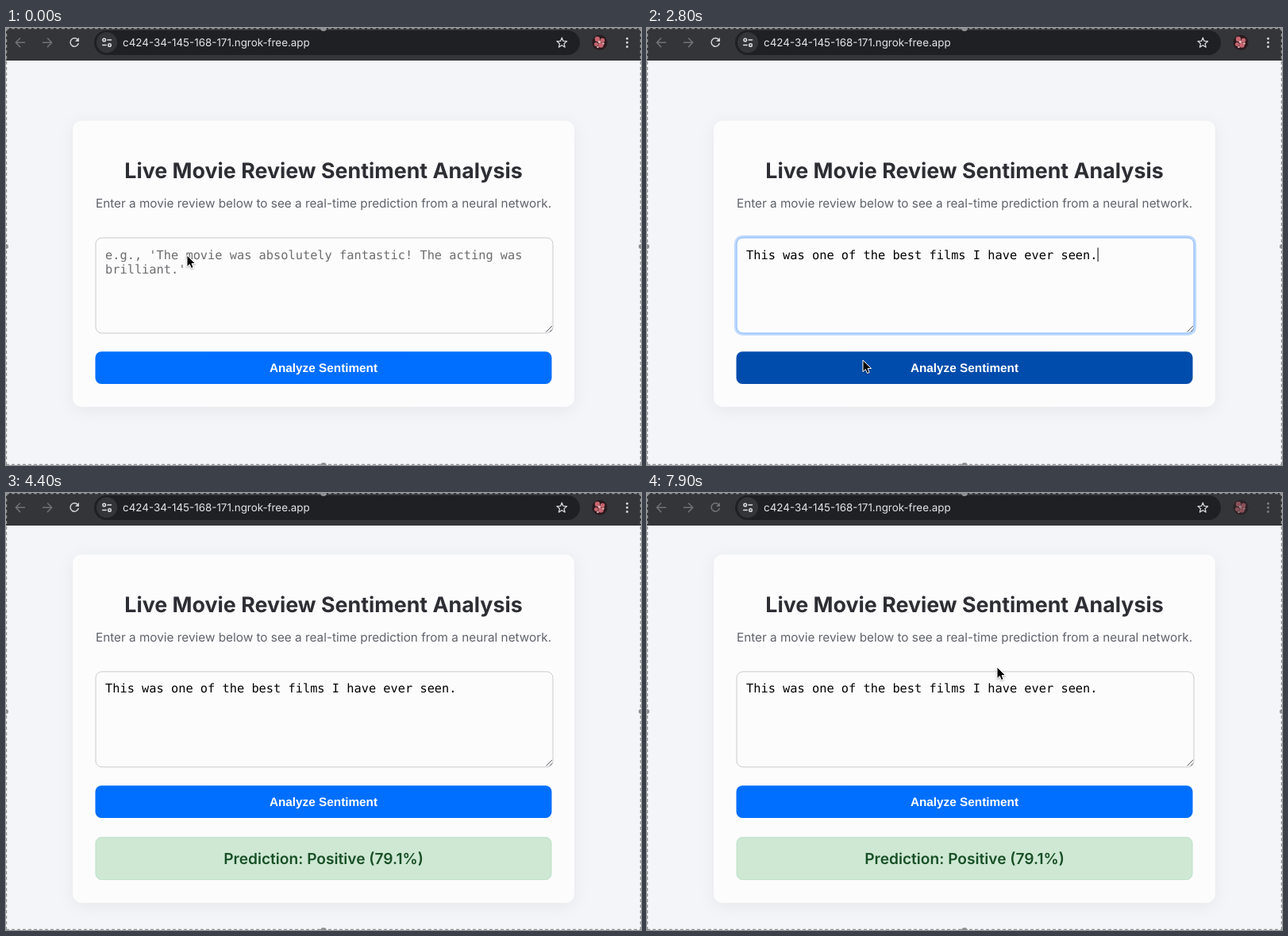
An HTML page for the animation above (8000 ms loop, 800 by 550 pixels).

```html
<!DOCTYPE html>
<html lang="en">
<head>
<meta charset="utf-8">
<title>Sentiment demo</title>
<style>
  html, body { margin: 0; width: 100%; height: 100%; overflow: hidden; background: #f4f5f9; }
  svg { display: block; width: 800px; height: 550px; }
  text { font-family: Inter, sans-serif; font-optical-sizing: none; text-rendering: geometricPrecision; white-space: pre; }
  .mid { text-anchor: middle; }
  .mono { font: 15.32px "DejaVu Sans Mono", monospace; }
  .line { fill: none; stroke-width: 1.5; stroke-linecap: round; stroke-linejoin: round; }
  .edge { fill: none; stroke: #939496; stroke-width: 2; stroke-dasharray: 4 3; }
</style>
</head>
<body>
<svg viewBox="0 0 800 550">
  <defs>
    <filter id="soft" x="-10%" y="-15%" width="120%" height="130%">
      <feDropShadow dx="0" dy="4" stdDeviation="9.5" flood-color="#000" flood-opacity=".06"/>
    </filter>
    <filter id="cast" x="-50%" y="-50%" width="200%" height="200%">
      <feDropShadow dx="0" dy="1" stdDeviation=".9" flood-color="#000" flood-opacity=".35"/>
    </filter>
  </defs>
  <rect width="800" height="550" fill="#f4f5f9"/>

  <!-- browser bar -->
  <rect width="800" height="41" fill="#343538"/>
  <rect x="111" y="3" width="612" height="31" rx="15.5" fill="#1f2023"/>
  <g class="line" stroke="#717276">
    <path d="M23.5 18.3H12.5M17.5 13l-5.2 5.3 5.2 5.3"/>
    <path d="M46.5 18.3h11M52.5 13l5.2 5.3-5.2 5.3"/>
  </g>
  <g id="reload">
    <path class="line" stroke="#d2d3d6" d="M90.6 15.2A5.2 5.2 0 1 0 91.2 19.6"/>
    <path fill="#d2d3d6" d="M92 12v5h-5z"/>
  </g>
  <circle cx="127" cy="18.3" r="13" fill="#343538"/>
  <g class="line" stroke="#dedfe2">
    <circle cx="123.7" cy="15" r="1.8"/><path d="M128 15h4.5"/>
    <circle cx="130.5" cy="21.5" r="1.8"/><path d="M121.7 21.5h4.5"/>
  </g>
  <text x="147" y="23.2" font-size="13.4" fill="#e5e6e9">c424-34-145-168-171.ngrok-free.app</text>
  <path id="star" class="line" stroke="#d2d3d6" style="stroke-width:1.3"/>
  <g id="avatar">
    <circle cx="748" cy="18.3" r="9.5" fill="#2a1a1e"/>
    <g fill="#c6656f">
      <circle cx="745" cy="14" r="3.2"/><circle cx="751.5" cy="15.5" r="2.8"/>
      <circle cx="743.5" cy="20.5" r="2.5"/><circle cx="749.5" cy="21.5" r="3.3"/>
    </g>
    <g fill="#e7b1b1">
      <circle cx="747.5" cy="17.5" r="1.8"/><circle cx="752.5" cy="19.5" r="1.3"/><circle cx="745.5" cy="24" r="1.3"/>
    </g>
  </g>
  <g id="dots" fill="#d2d3d6">
    <circle cx="782.5" cy="13.2" r="1.5"/><circle cx="782.5" cy="18.3" r="1.5"/><circle cx="782.5" cy="23.4" r="1.5"/>
  </g>

  <!-- page -->
  <rect id="card" x="84" width="632" rx="11.5" fill="#fcfcfd" filter="url(#soft)"/>
  <g id="form">
    <text class="mid" x="400" y="189.2" font-size="26.81" font-weight="700" fill="#2d2e33">Live Movie Review Sentiment Analysis</text>
    <text class="mid" x="400" y="226" font-size="15.32" fill="#5f6269">Enter a movie review below to see a real-time prediction from a neural network.</text>
    <rect id="ring" x="111.4" y="262.4" width="579.2" height="123.2" rx="9" fill="none" stroke="#bfd9fd" stroke-width="3"/>
    <rect id="box" x="113" y="264" width="576" height="120" rx="7.7" fill="#fcfcfd"/>
    <path d="M680.5 382.5l7.5-7.5M685 382.5l3-3" stroke="#55565a" stroke-width="1"/>
    <g id="hint" fill="#6d6d70">
      <text class="mono" x="125" y="290.5">e.g., 'The movie was absolutely fantastic! The acting was</text>
      <text class="mono" x="125" y="308.5">brilliant.'</text>
    </g>
    <text id="review" class="mono" x="125" y="290.5" fill="#000">This was one of the best films I have ever seen.</text>
    <rect id="caret" y="276.5" width="1" height="17.5" fill="#000"/>
    <rect id="button" x="112.5" y="407.3" width="575" height="40.7" rx="7.7"/>
    <text class="mid" x="400" y="433" fill="#fff" style="font:bold 15.32px 'Liberation Sans',Arial,sans-serif">Analyze Sentiment</text>
  </g>
  <g id="result">
    <rect x="113" y="433.3" width="574" height="53.3" rx="7.4" fill="#cee8d4" stroke="#bcdfc5"/>
  </g>
  <text id="status" class="mid" x="400" y="466.6" font-size="19.15" font-weight="600"></text>

  <!-- capture frame -->
  <path class="edge" d="M0 .3H800M0 549.8H800M.2 0V550M799.8 0V550"/>
  <g fill="#8f9093">
    <circle cx="400" cy="0" r="4"/><circle cx="400" cy="551" r="4"/>
    <circle cx="0" cy="275" r="3"/><circle cx="800" cy="275" r="3"/>
    <circle cx="0" cy="0" r="3"/><circle cx="800" cy="0" r="3"/>
  </g>

  <path id="cursor" d="M0 0V14.6L3.3 11.5L5.5 16.5L8.1 15.4L6 10.5H10.6Z" fill="#000" stroke="#fff" stroke-width="1" filter="url(#cast)"/>
</svg>
<script>
const LOOP = 8000, STEP = 100;
const FOCUS = 600, PASTE = 1600, HOVER = 2450, CLICK = 3130, ANSWER = 4000, BLUR = 5000;
const $ = id => document.getElementById(id);
const set = (id, attrs) => { for (const k in attrs) $(id).setAttribute(k, attrs[k]); };
const show = (id, on) => set(id, { visibility: on ? "visible" : "hidden" });
const clamp = v => Math.min(1, Math.max(0, v));
const smooth = v => v * v * (3 - 2 * v);
const mix = (a, b, p) => `rgb(${a.map((v, i) => Math.round(v + (b[i] - v) * p))})`;

const starPoints = Array.from({ length: 10 }, (_, i) => {
  const a = i * Math.PI / 5 - Math.PI / 2, r = i % 2 ? 2.9 : 6.6;
  return `${(700.3 + r * Math.cos(a)).toFixed(2)} ${(18.8 + r * Math.sin(a)).toFixed(2)}`;
});
set("star", { d: "M" + starPoints.join("L") + "Z" });

function pointer(t) {
  if (t <= 3200) {
    const p = smooth(clamp((t - 2000) / 600));
    return [228 + 44 * p, 286 + 132 * p];
  }
  if (t < 3600) {
    const p = ((t - 3200) / 200) ** 2;
    return [272 - 170 * p, 418 + 43 * p];
  }
  if (t < 7400) return [-50, 500];
  const p = (1 - clamp((t - 7400) / 500)) ** 2;
  return [441 + 530 * p, 219 + 120 * p];
}

function draw(t) {
  const focused = t >= FOCUS && t < CLICK;
  const pasted = t >= PASTE;
  const shift = t < CLICK ? 0 : t < ANSWER ? 38.2 : 39.1;

  set("card", { y: 116.7 - shift, height: 360 + 2 * shift });
  set("form", { transform: `translate(0 ${-shift})` });

  show("ring", focused);
  set("box", { stroke: focused ? "#80b5f8" : "#c9cacc" });
  show("hint", !pasted);
  show("review", pasted);
  const since = t - (pasted ? PASTE : FOCUS);
  show("caret", focused && since % 1000 < 500);
  set("caret", { x: pasted ? 567.6 : 125 });

  const dark = t < CLICK ? smooth(clamp((t - HOVER) / 200)) : 1 - smooth(clamp((t - CLICK) / 260));
  set("button", { fill: mix([0, 111, 255], [0, 76, 172], dark) });

  const done = t >= ANSWER;
  show("result", done);
  show("status", t >= CLICK);
  $("status").textContent = done ? "Prediction: Positive (79.1%)" : "Analyzing...";
  set("status", { fill: done ? "#184f25" : "#212226" });

  const dim = t >= BLUR;
  set("reload", { opacity: dim ? .4 : 1 });
  set("dots", { opacity: dim ? .45 : 1 });
  set("avatar", { opacity: dim ? .6 : 1 });

  set("cursor", { transform: `translate(${pointer(t)})` });
}

const start = performance.now();
function frame(now) {
  const t = Math.max(0, now - start) % LOOP;
  draw(Math.floor(t / STEP) * STEP);
  requestAnimationFrame(frame);
}
draw(0);
requestAnimationFrame(frame);
</script>
</body>
</html>
```
